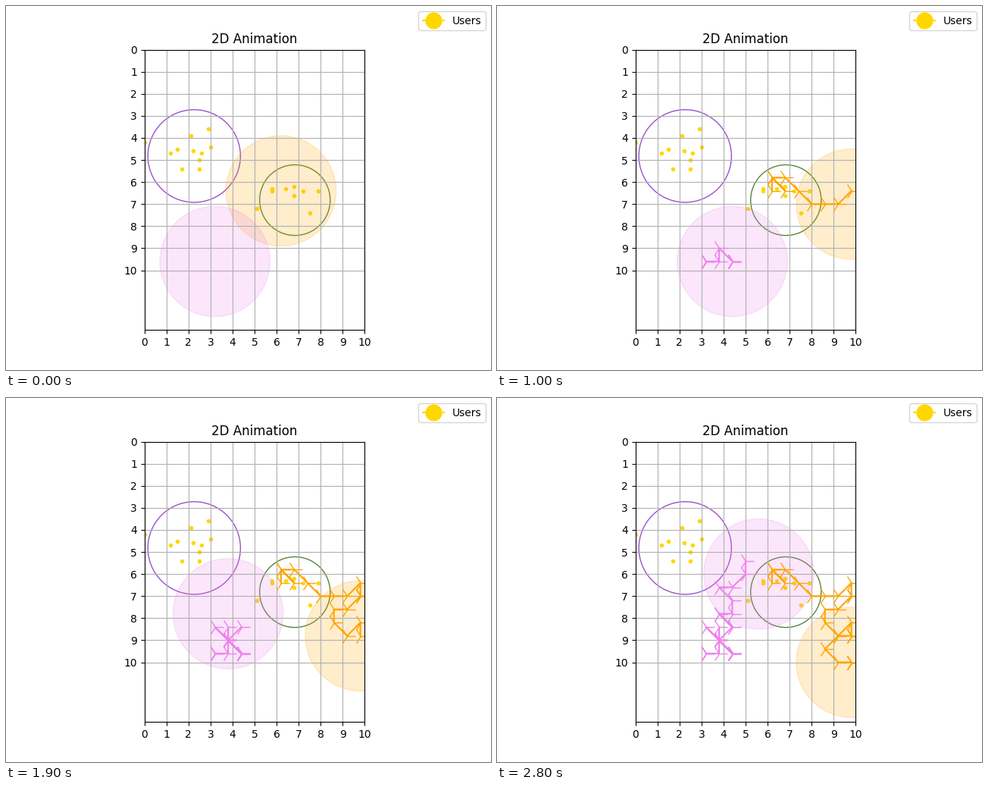
Recreate the animation shown at these times as a matplotlib script. Size 640 by 480 pixels, loop 2.9 s.

```python
import numpy as np
import matplotlib.pyplot as plt
from matplotlib.animation import FuncAnimation
from matplotlib.lines import Line2D
from matplotlib.patches import Circle

FRAMES, INTERVAL = 29, 100
STEP, RANGE = 0.6, 2.5

# Compass headings on a y-down plane; "-" is a blocked move.
HEADINGS = {"N": (0, -1), "S": (0, 1), "E": (1, 0), "W": (-1, 0),
            "NE": (1, -1), "NW": (-1, -1), "SE": (1, 1), "SW": (-1, 1),
            "-": (0, 0)}

USERS = [(2.9, 3.6), (2.1, 3.9), (0, 4.2), (1.5, 4.5), (3.0, 4.4),
         (1.2, 4.7), (2.2, 4.6), (2.6, 4.7), (2.5, 5.0), (1.7, 5.4),
         (2.5, 5.4), (5.8, 6.3), (5.8, 6.4), (6.4, 6.3), (6.8, 6.2),
         (6.8, 6.6), (7.2, 6.4), (7.9, 6.4), (7.5, 7.4), (5.1, 7.2)]


def walk(start, moves):
    steps = [(0, 0)] + [HEADINGS[m] for m in moves.split()]
    return np.array(start) + STEP * np.cumsum(steps, axis=0)


class Drone:
    def __init__(self, ax, color, start, moves):
        self.path = walk(start, moves)
        self.disc = ax.add_patch(Circle(start, RANGE, color=color, alpha=0.2))
        self.trail, = ax.plot([], [], color=color, marker="4", markersize=16)

    def show(self, i):
        self.disc.center = self.path[i]
        self.trail.set_data(self.path[:i, 0], self.path[:i, 1])


fig, ax = plt.subplots(figsize=(6.4, 4.8), dpi=100)
ax.set_title("2D Animation")
ax.set_aspect("equal")
ax.set_xticks(range(11))
ax.set_yticks(range(11))
ax.grid(True)

ax.scatter(*zip(*USERS), s=36, marker=".", color="gold", linewidths=1)
for center, radius, color in [((2.26, 4.82), 2.1, "#9a50d0"),
                              ((6.83, 6.82), 1.6, "#56853a")]:
    ax.add_patch(Circle(center, radius, fill=False, edgecolor=color))

drones = [
    Drone(ax, "orange", (6.2, 6.4),
          "N SE NW E SE SE E E NE S - - SW W S SE NE S - - W SW SE E - - - -"),
    Drone(ax, "violet", (3.2, 9.6),
          "- - E N SE - - - - - NW N S SE NW NW SE NE NW SE NW E N NW E NE N SE"),
]

ax.set_xlim(0, 10)
ax.set_ylim(12.705, 0)
fig.legend(handles=[Line2D([], [], color="gold", marker="o", markersize=15,
                           label="Users")], loc="upper right")


def update(i):
    for drone in drones:
        drone.show(i)
    return []


anim = FuncAnimation(fig, update, frames=FRAMES, interval=INTERVAL,
                     repeat=True, repeat_delay=0)
plt.show()
```
